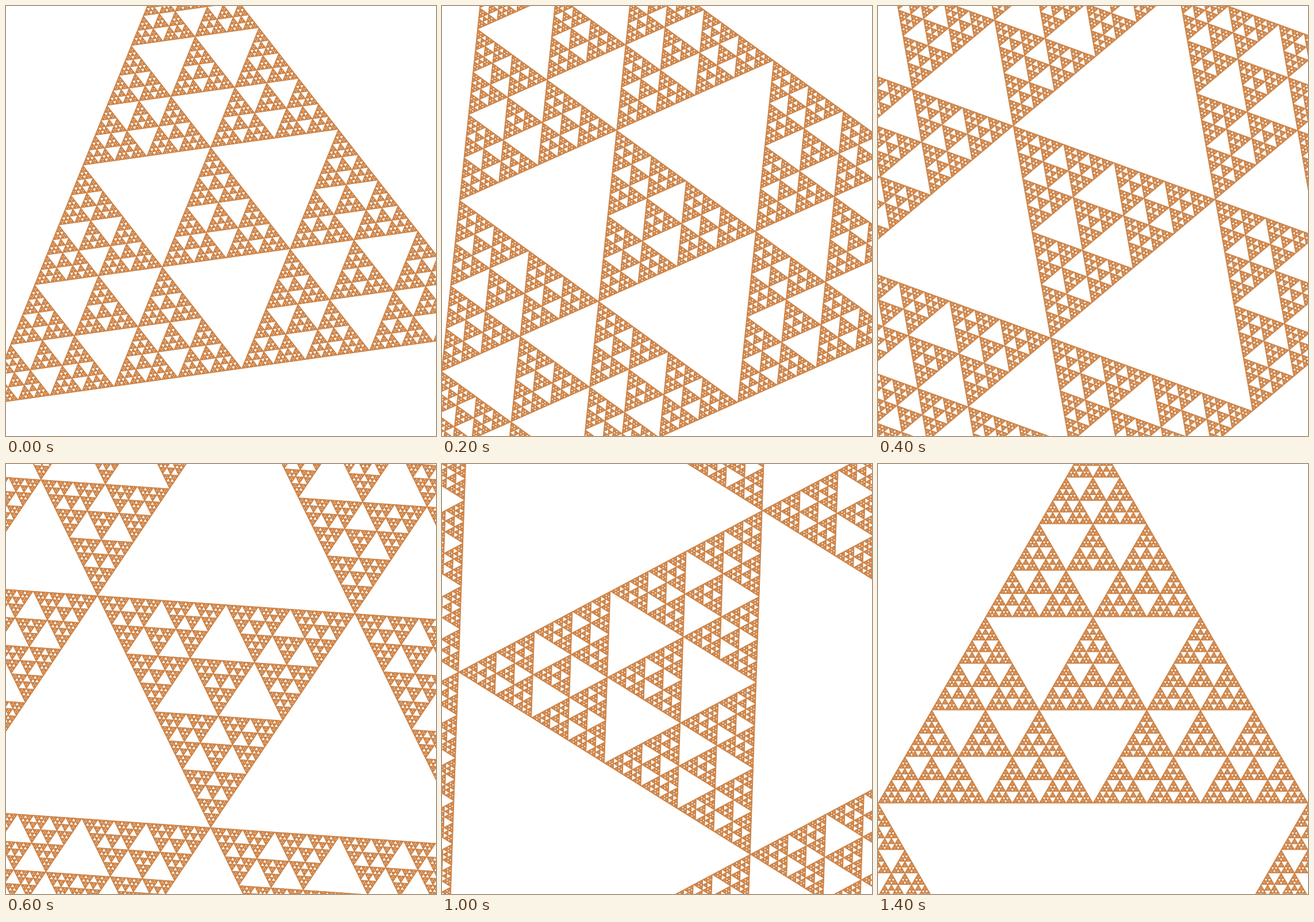
Animation, 748 px wide and 748 px high, one loop 1500 ms. Source, as an HTML page with a canvas:

```html
<!DOCTYPE html>
<html lang="en">
<head>
<meta charset="utf-8">
<title>Fractal zoom</title>
<style>
  html, body { margin: 0; width: 100%; height: 100%; overflow: hidden; background: #fff; }
  canvas { display: block; }
</style>
</head>
<body>
<canvas id="stage" width="748" height="748"></canvas>
<script>
const SIZE = 748;
const STEPS = 15;
const STEP_MS = 100;
const MIN_SIDE = 4;
const BATCH = 2000;
const COLOR = '#cd8245';

const stage = document.getElementById('stage').getContext('2d');
const cache = [];

// Each triangle is given by its centroid and circumradius.
// It splits into three half-size corners and a quarter-size centre,
// down to a fixed size on screen, so the texture stays even.
function drawFractal(ctx, scale, turn) {
  const dirs = [0, 1, 2].map(k => {
    const a = -Math.PI / 2 - turn + k * 2 * Math.PI / 3;
    return [Math.cos(a), Math.sin(a)];
  });
  const [[ax, ay], [bx, by], [cx, cy]] = dirs;
  const minRadius = MIN_SIDE / Math.sqrt(3);
  let count = 0;

  function flush() {
    ctx.fill();
    ctx.stroke();
    ctx.beginPath();
    count = 0;
  }

  function split(x, y, r) {
    const reach = r + 1;
    if (x + reach < 0 || y + reach < 0 || x - reach > SIZE || y - reach > SIZE) return;
    if (r < minRadius) {
      ctx.moveTo(x + ax * r, y + ay * r);
      ctx.lineTo(x + bx * r, y + by * r);
      ctx.lineTo(x + cx * r, y + cy * r);
      ctx.closePath();
      if (++count === BATCH) flush();
      return;
    }
    const h = r / 2;
    for (const [dx, dy] of dirs) split(x + dx * h, y + dy * h, h);
    split(x, y, r / 4);
  }

  ctx.fillStyle = ctx.strokeStyle = COLOR;
  ctx.lineWidth = 1;
  ctx.lineJoin = 'bevel';
  ctx.beginPath();
  split(SIZE / 2, SIZE / 2, SIZE * scale / Math.sqrt(3));
  flush();
}

// One loop zooms in four times while turning a third of a circle.
function render(step) {
  if (!cache[step]) {
    const canvas = document.createElement('canvas');
    canvas.width = canvas.height = SIZE;
    const ctx = canvas.getContext('2d');
    ctx.fillStyle = '#fff';
    ctx.fillRect(0, 0, SIZE, SIZE);
    const p = (step + 1) / STEPS;
    drawFractal(ctx, 1 + 3 * p, p * 2 * Math.PI / 3);
    cache[step] = canvas;
  }
  return cache[step];
}

const start = performance.now();
let shown = -1;

function tick() {
  const step = Math.floor((performance.now() - start) / STEP_MS) % STEPS;
  if (step !== shown) {
    stage.drawImage(render(step), 0, 0);
    shown = step;
  } else {
    render((step + 1) % STEPS);
  }
  requestAnimationFrame(tick);
}
tick();
</script>
</body>
</html>
```
